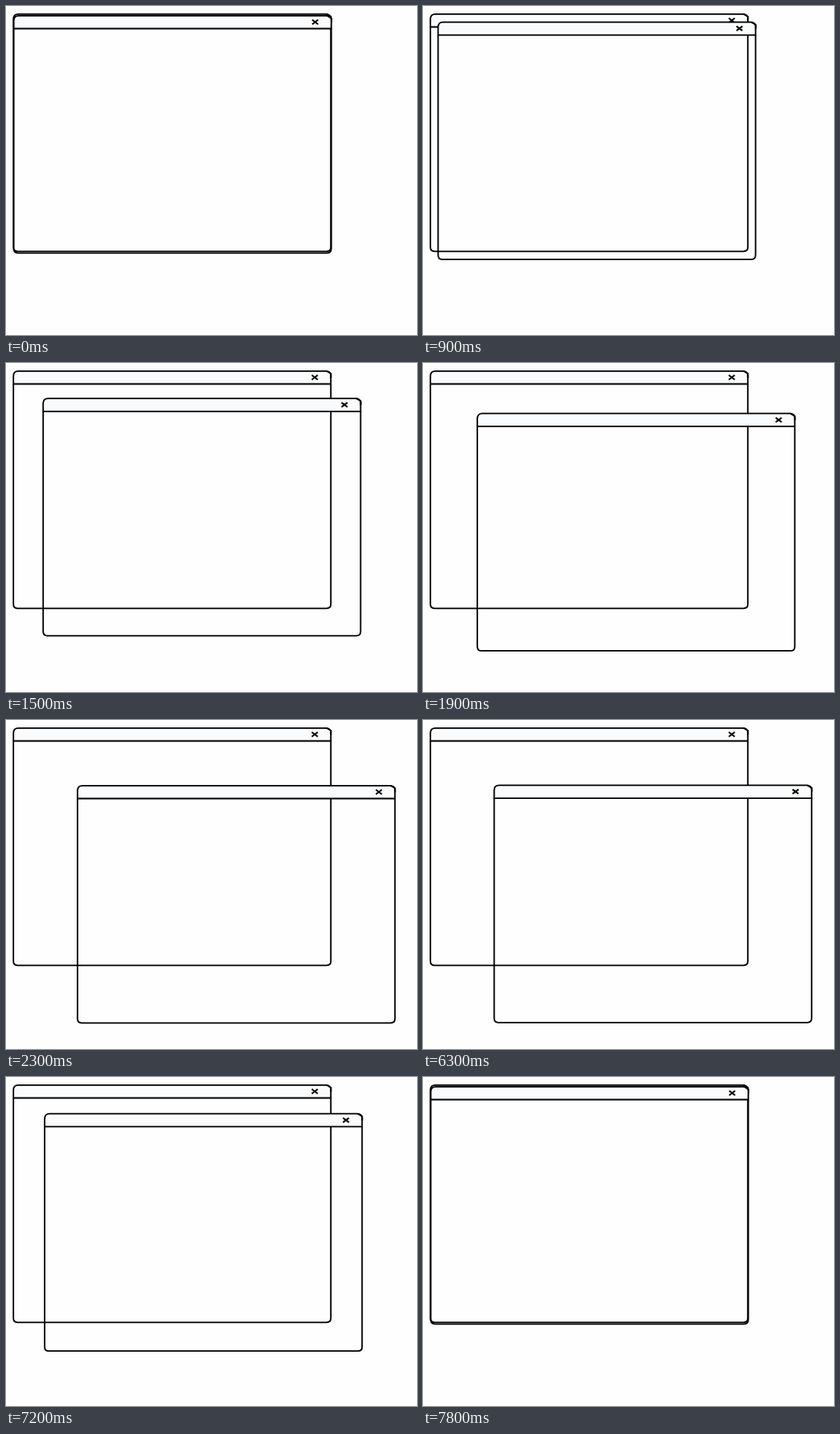
An HTML page that plays this animation: 500x400 px, repeating every 8000 ms.

```html
<!DOCTYPE html>
<html lang="en">
<head>
<meta charset="utf-8">
<title>Dragged window</title>
<style>
  html, body { margin: 0; width: 100%; height: 100%; overflow: hidden; background: #fefefe; }
  svg { display: block; width: 500px; height: 400px; }
</style>
</head>
<body>
<svg viewBox="0 0 500 400">
  <defs>
    <g id="window" fill="none" stroke="#000" stroke-width="1.8">
      <path d="M9 25.5V293Q9 298.3 14 298.3H390Q395.2 298.3 395.2 293V25.5"/>
      <path d="M9 25.5V16Q9 9.8 15 9.8H390Q395.2 10.5 395.2 15V25.5Z" fill="#fafbfc"/>
      <path d="M390 9.8L395.4 13V18"/>
      <path d="M372 14.8L379.2 20.2M379.2 14.8L372 20.2" stroke-width="2"/>
    </g>
  </defs>
  <use href="#window"/>
  <use href="#window" id="front"/>
</svg>
<script>
const LOOP = 8000, TICK = 100;
const REST = [0.5, 2], AWAY = [78, 70];
const front = document.getElementById("front");

// Share of the way after `step` of `steps`: speeds up during `ramp`, then steady.
function travel(step, steps, ramp, power) {
  const s = Math.min(Math.max(step, 0), steps);
  const dist = s < ramp ? ramp / power * (s / ramp) ** power
                        : ramp / power + s - ramp;
  return dist / (steps - ramp + ramp / power);
}

function draw(now) {
  const tick = Math.floor(now % LOOP / TICK);
  const k = travel(tick - 4, 19, 9.5, 1.78) - travel(tick - 62, 16, 7.2, 2);
  const [x, y] = REST.map((from, i) => from + (AWAY[i] - from) * k);
  front.setAttribute("transform", `translate(${x} ${y})`);
}

const start = performance.now();
function loop() {
  draw(performance.now() - start);
  requestAnimationFrame(loop);
}
loop();
</script>
</body>
</html>
```
